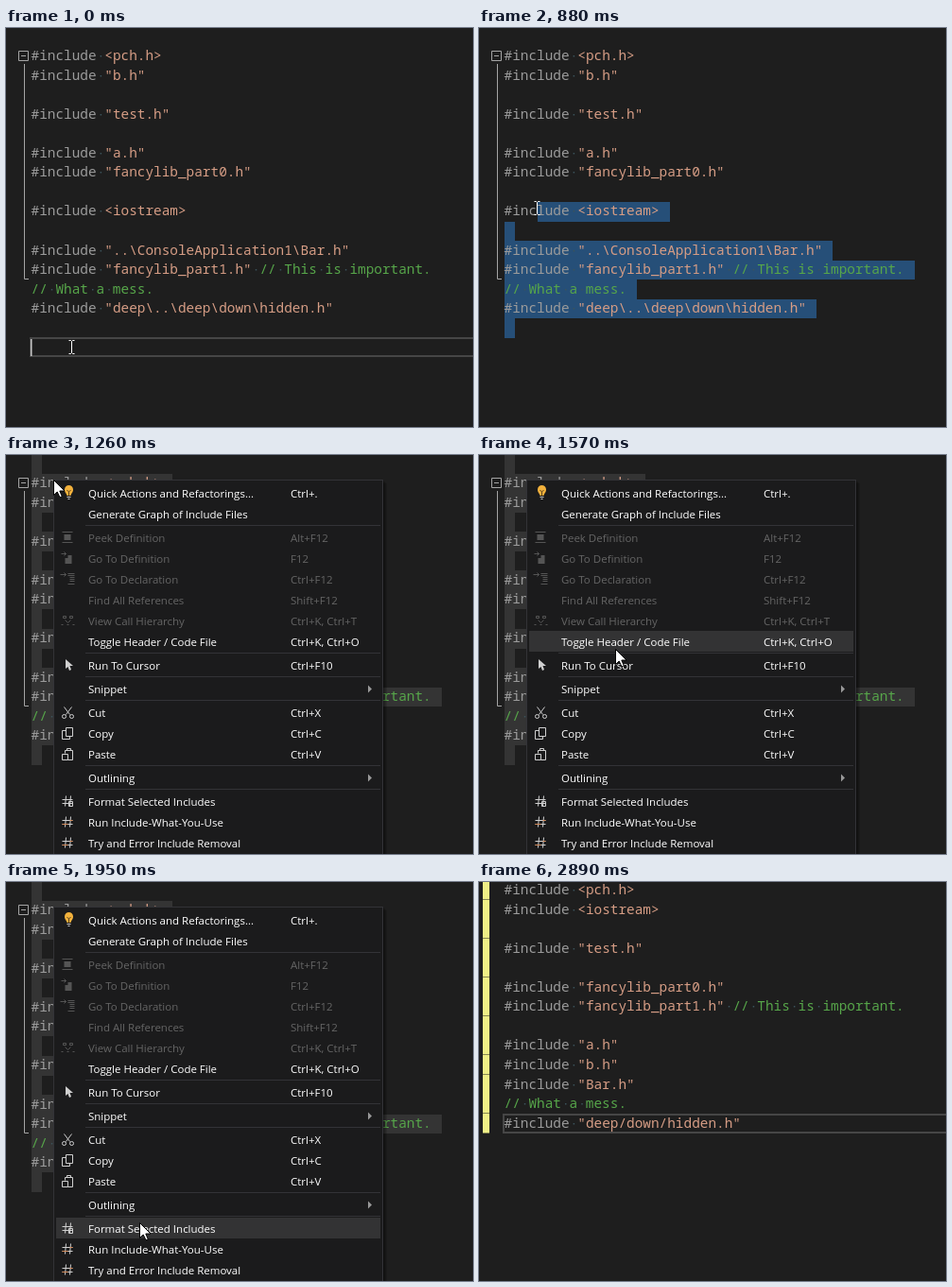
Recreate the animation shown at these times as an HTML page with a canvas. Size 494 by 422 pixels, loop 3270 ms.

```html
<!DOCTYPE html>
<html>
<head>
<meta charset="utf-8">
<style>
html, body { margin: 0; width: 100%; height: 100%; overflow: hidden; background: #1e1e1e; }
canvas { display: block; }
</style>
</head>
<body>
<canvas id="stage" width="494" height="422"></canvas>
<script>
const ctx = document.getElementById('stage').getContext('2d');
const LOOP = 3270, LEFT = 27, CHAR = 8.64, LINE = 20.55;

const before = [
  '', '#include <pch.h>', '#include "b.h"', '', '#include "test.h"', '',
  '#include "a.h"', '#include "fancylib_part0.h"', '', '#include <iostream>', '',
  '#include "..\\ConsoleApplication1\\Bar.h"',
  '#include "fancylib_part1.h" // This is important.',
  '// What a mess.', '#include "deep\\..\\deep\\down\\hidden.h"', ''
];
const after = [
  '#include <pch.h>', '#include <iostream>', '', '#include "test.h"', '',
  '#include "fancylib_part0.h"', '#include "fancylib_part1.h" // This is important.', '',
  '#include "a.h"', '#include "b.h"', '#include "Bar.h"', '// What a mess.',
  '#include "deep/down/hidden.h"'
];

// label, shortcut, icon, flags: d = disabled, s = separator above, m = submenu
const menu = [
  ['Quick Actions and Refactorings...', 'Ctrl+.', 'bulb', ''],
  ['Generate Graph of Include Files', '', '', ''],
  ['Peek Definition', 'Alt+F12', 'peek', 'ds'],
  ['Go To Definition', 'F12', 'definition', 'd'],
  ['Go To Declaration', 'Ctrl+F12', 'declaration', 'd'],
  ['Find All References', 'Shift+F12', '', 'd'],
  ['View Call Hierarchy', 'Ctrl+K, Ctrl+T', 'hierarchy', 'd'],
  ['Toggle Header / Code File', 'Ctrl+K, Ctrl+O', '', ''],
  ['Run To Cursor', 'Ctrl+F10', 'pointer', 's'],
  ['Snippet', '', '', 'sm'],
  ['Cut', 'Ctrl+X', 'cut', 's'],
  ['Copy', 'Ctrl+C', 'copy', ''],
  ['Paste', 'Ctrl+V', 'paste', ''],
  ['Outlining', '', '', 'sm'],
  ['Format Selected Includes', '', 'hashBox', 's'],
  ['Run Include-What-You-Use', '', 'hash', ''],
  ['Try and Error Include Removal', '', 'hash', '']
];

const hashPath = 'M-6-2H5M-6 2H5M-2-6l-1 11M3-6l-1 11';
const icons = {
  peek: 'M-6-6H5M-6 5H5M-4-3H3M-4-2H3M-4-1H3M-4 0H3M-4 1H3M-4 2H3',
  definition: 'M-7-5h5M-4-7l2 2-2 2M-3 0H4M-3 1H4M-3 2H4M-3 3H4M-3 4H4M-3 5H4M0-3H4M0-2H4M0-1H4',
  declaration: 'M-8-5h6M-4-7l2 2-2 2M0-6h7M0-4h7M2-2h5M2 0h5M2 2h5M0 5h7',
  hierarchy: 'M-5-5h3v2h-3zM2-5h3v2h-3zM-3-1l3 3M3-1l-3 3M-7 4h2M-1 4h2M5 4h2',
  cut: 'M-4-6L2 2M4-6L-2 2M-6 4a2 2 0 1 0 4 0a2 2 0 1 0-4 0M2 4a2 2 0 1 0 4 0a2 2 0 1 0-4 0',
  copy: 'M-2-6H5V3H-2zM-2-3H-6V6H2V3',
  paste: 'M-3-1V-4H5V6H0M-1-4V-6H3V-4M-6 0H0V6H-6z',
  hash: hashPath,
  hashBox: hashPath + 'M1 0H5V5H1z'
};

// time, pointer x, pointer y
const poses = [
  [0, 69, 337], [800, 63, 272], [880, 61, 190], [960, 58, 95], [1040, 52, 28],
  [1120, 48, 12], [1190, 50, 26], [1490, 96, 115], [1570, 144, 205], [1640, 152, 265],
  [1720, 155, 307], [1800, 152, 332], [1870, 146, 350], [1950, 141, 360],
  [2350, 144, 378], [2660, 205, 345], [2740, 295, 290], [2820, 367, 253]
];

function box(x, y, w, h, color) {
  ctx.fillStyle = color;
  ctx.fillRect(x, y, w, h);
}

function shape(path, x, y, fill, stroke, width = 1) {
  const p = new Path2D(path);
  ctx.save();
  ctx.translate(x, y);
  ctx.lineWidth = width;
  if (fill) { ctx.fillStyle = fill; ctx.fill(p); }
  if (stroke) { ctx.strokeStyle = stroke; ctx.stroke(p); }
  ctx.restore();
}

function text(s, x, y, color) {
  ctx.fillStyle = color;
  ctx.fillText(s, x, y);
}

function codeLine(line, y) {
  const [, directive, path, comment] = line.match(/^(#include)?(.*?)(\/\/.*)?$/);
  let x = LEFT - .5;
  for (const [part, color] of [[directive, '#9b9b9b'], [path, '#d69d85'], [comment, '#57a64a']]) {
    if (!part) continue;
    text(part, x, Math.round(y) + 5, color);
    x += part.length * CHAR;
  }
  [...line].forEach((c, i) => {
    if (c === ' ') box(LEFT + i * CHAR + 3.5, Math.round(y), 1.5, 1.5, '#3b535b');
  });
}

function code(lines, firstY) {
  ctx.font = '14.4px "Noto Sans Mono", "DejaVu Sans Mono", monospace';
  lines.forEach((line, i) => codeLine(line, firstY + i * LINE));
}

function currentLine(y) {
  ctx.strokeStyle = '#464646';
  ctx.lineWidth = 2;
  ctx.strokeRect(26, y - 9, 480, 19);
}

function selection(px, py, whole, color) {
  const firstRow = whole ? 0 : Math.round((py - 8.5) / LINE);
  const rowTop = i => Math.round(i * LINE - 1);
  before.forEach((line, i) => {
    if (i < firstRow) return;
    const column = !whole && i === firstRow ? Math.round((px - LEFT) / CHAR) : 0;
    const start = Math.round(LEFT + Math.min(column, line.length) * CHAR);
    const end = Math.round(LEFT + line.length * CHAR + 10.5);
    box(start, rowTop(i), end - start, rowTop(i + 1) - rowTop(i), color);
  });
}

function outline() {
  shape('M13.5 24.5h10v10h-10zM16 29.5h5M19.5 38V265.5H24', 0, 0, null, '#a5a5a5');
}

function icon(name, y, disabled) {
  if (name === 'bulb') {
    shape('M-2 3C-2 1-4.5 0-4.5-3.5a4.5 4.5 0 0 1 9 0C4.5 0 2 1 2 3z', 66.5, y - 1, '#f2b13c');
    shape('M-2 4.5H2M-1 6.5H1', 66.5, y - 1, null, '#d0d0d0');
    shape('M-2-3L0-1L2-3M0-1V3', 66.5, y - 1, null, '#5a431d');
  } else if (name === 'pointer') {
    shape('M-3-6V4l2.5-2L1 6l2-1L1.5 1H5z', 66, y - 1, '#d0d0d0');
  } else if (name) {
    shape(icons[name], 65.5, y - .5, null, disabled ? '#555' : '#d0d0d0');
    if (name === 'hash') shape('M-6 2H0M2-2H5', 65.5, y - .5, null, '#d58a58');
  }
}

function contextMenu(px, py) {
  for (let i = 1; i <= 4; i++) box(399, 26 + i, i, 396, 'rgba(0, 0, 0, .14)');
  box(50, 26, 349, 400, '#333337');
  box(51, 27, 347, 400, '#1b1b1c');
  ctx.font = '11.5px "Open Sans", "Noto Sans", sans-serif';
  let y = 19;
  for (const [label, keys, glyph, flags] of menu) {
    const disabled = flags.includes('d');
    const separated = flags.includes('s');
    y += separated ? 25 : 22;
    if (separated) box(84, y - 14, 312, 1, '#333337');
    if (!disabled && px > 60 && Math.abs(py - y) < 11) box(53, y - 12, 343, 22, '#333334');
    const color = disabled ? '#656565' : '#fff';
    text(label, 87, y + 4, color);
    text(keys, 301, y + 4, color);
    icon(glyph, y, disabled);
    if (flags.includes('m')) shape('M0-4L4 0L0 4z', 383, y - .5, '#999');
  }
}

function beam(x, y) {
  shape('M-3-7H-1L0-6L1-7H3M0-6V6M-3 7H-1L0 6L1 7H3', x + .5, y + .5, null, '#fff');
}

function arrow(x, y) {
  shape('M.5.5V16.5L4.2 13L7 18.8L9.3 17.8L6.8 12H12z', x, y, '#fff', '#000');
}

function draw(t) {
  const [, px, py] = poses.findLast(p => p[0] <= t);
  box(0, 0, 494, 422, '#1e1e1e');

  if (t < 2350) {
    const menuOpen = t >= 1260 && t < 2270;
    if (t < 800) {
      currentLine(337);
      box(26, 329, 1.5, 18, '#c8c8c8');
    } else {
      selection(px, py, t >= 1120, menuOpen ? '#343434' : '#264f78');
    }
    code(before, 8.5);
    outline();
    if (menuOpen) contextMenu(px, py);
  } else {
    after.forEach((_, i) => box(4, Math.round(i * LINE - 2), 7, 20.5, '#efef86'));
    currentLine(255);
    code(after, 8);
  }

  if (t >= 1190 && t < 2350) arrow(px, py);
  else if (t < 2890) beam(px, py);
}

function frame() {
  draw(performance.now() % LOOP);
  requestAnimationFrame(frame);
}
frame();
</script>
</body>
</html>
```
